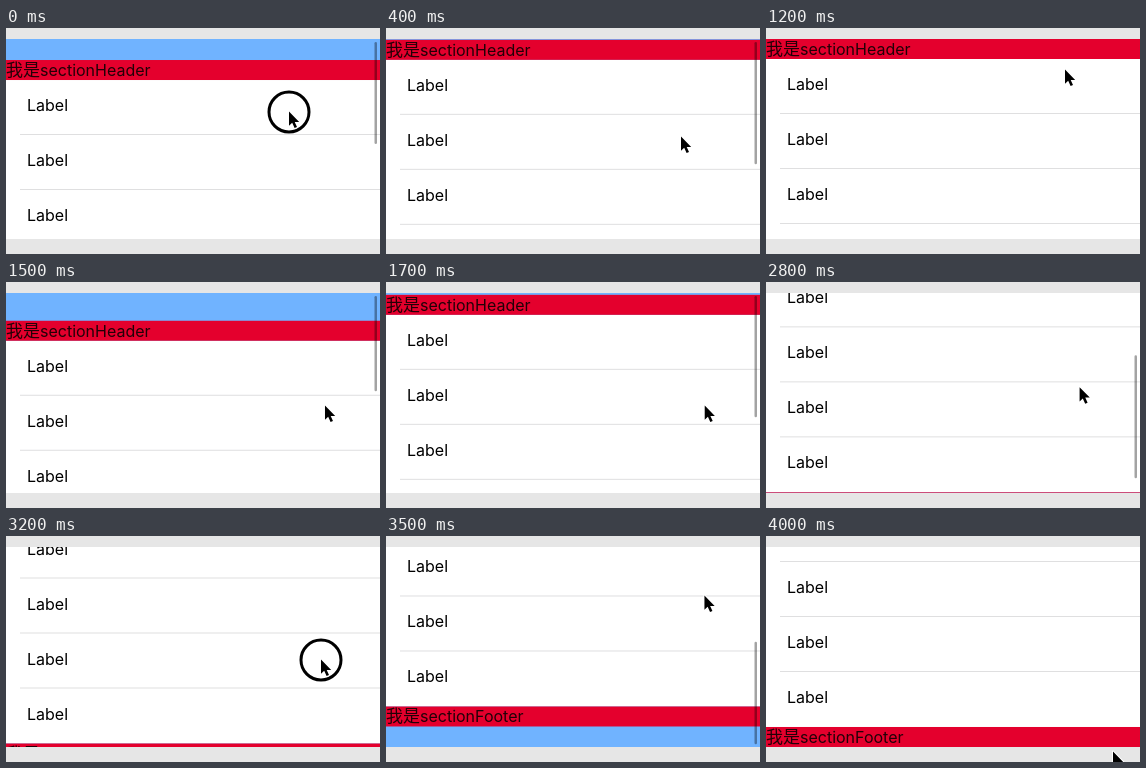
An HTML page with a canvas that plays this animation: 374 px wide and 226 px high, repeating every 4100 ms.

```html
<!DOCTYPE html>
<html lang="zh">
<head>
<meta charset="utf-8">
<style>
  html, body { margin: 0; width: 100%; height: 100%; overflow: hidden; background: #e6e6e6; }
  canvas { display: block; }
</style>
</head>
<body>
<canvas id="stage" width="374" height="226"></canvas>
<script>
const ctx = document.getElementById('stage').getContext('2d');
const LOOP = 4100, STEP = 100;
const TOP = 11, VIEW = 200, ROW = 55, BAR = 20, ROWS = 5;
const CONTENT = BAR * 2 + ROW * ROWS, MAX = CONTENT - VIEW;
const RED = '#e4002d', BLUE = '#70b3ff';

// Pointer path: time, x, y
const path = [
  [0, 283, 84], [100, 295, 109], [700, 295, 109], [1200, 299, 42], [1250, 299, 42],
  [1440, 319, 124], [2180, 318, 124], [2300, 313, 98], [2370, 311, 76], [2500, 311, 72],
  [3000, 315, 124], [3210, 315, 124], [3460, 318, 60], [3550, 319, 60], [4000, 347, 216]
];

// Each drag: pressed from/to, pointer y at the press, scroll offset at the press
const drags = [
  { from: 0, to: 110, y: 41.3, base: 0 },
  { from: 1230, to: 1450, y: 42, base: 0 },
  { from: 2150, to: 2370, y: 124, base: 0 },
  { from: 3130, to: 3470, y: 124, base: 98.5 }
];

// Scroll indicator: shown from, fade start
const shown = [[0, 420], [1260, 1740], [2200, 2860], [3220, 3780]];

const clamp = (v, lo, hi) => Math.min(hi, Math.max(lo, v));
const rubber = d => VIEW * (1 - 1 / (d * 0.55 / VIEW + 1));

function pointer(t) {
  let i = 0;
  while (i < path.length - 2 && t >= path[i + 1][0]) i++;
  const [t0, x0, y0] = path[i], [t1, x1, y1] = path[i + 1];
  let k = clamp((t - t0) / (t1 - t0), 0, 1);
  if (t1 - t0 > 300) k = k * k * (3 - 2 * k);
  return { x: x0 + (x1 - x0) * k, y: y0 + (y1 - y0) * k };
}

function dragged(drag, t) {
  const raw = drag.base + drag.y - pointer(t).y;
  if (raw < 0) return -rubber(-raw);
  if (raw > MAX) return MAX + rubber(raw - MAX);
  return raw;
}

function scrollAt(t) {
  const drag = drags.filter(d => t >= d.from).pop();
  if (t <= drag.to) return dragged(drag, t);
  const start = dragged(drag, drag.to), dt = t - drag.to;
  const edge = clamp(start, 0, MAX);
  if (edge !== start) {
    const w = dt * 0.019;
    return edge + (start - edge) * (1 + w) * Math.exp(-w);
  }
  return 98.5 + (start - 98.5) * Math.exp(-dt / 150);
}

function rect(x, y, w, h, color) {
  ctx.fillStyle = color;
  ctx.fillRect(x, y, w, h);
}

function text(str, x, y, font) {
  ctx.fillStyle = '#000';
  ctx.font = font;
  ctx.fillText(str, x, y);
}

function band(y, title) {
  rect(0, y, 374, BAR, RED);
  ctx.globalAlpha = 0.85;
  text('我是', 0, y + 16, '17px "Noto Sans CJK SC", "Noto Sans CJK", sans-serif');
  text(title, 34, y + 16, '16px Inter, sans-serif');
  ctx.globalAlpha = 1;
}

function list(scroll) {
  const y = TOP - scroll;
  rect(0, TOP, 374, VIEW, BLUE);
  rect(0, y + BAR, 374, ROW * ROWS, '#fff');
  for (let i = 0; i < ROWS; i++) {
    const top = y + BAR + i * ROW;
    text('Label', 21, top + 31, '16px Inter, sans-serif');
    if (i < ROWS - 1) rect(14, top + ROW - 1, 360, 1, '#dfdfe0');
  }
  band(y, 'sectionHeader');
  band(y + BAR + ROW * ROWS, 'sectionFooter');
}

function indicator(scroll, t) {
  const phase = shown.filter(p => t >= p[0]).pop();
  const alpha = clamp(1 - (t - phase[1]) / 150, 0, 1);
  if (!alpha) return;
  const inside = clamp(scroll, 0, MAX), over = Math.abs(scroll - inside);
  const top = 14 + inside * 195 / CONTENT + Math.max(0, scroll - MAX);
  ctx.globalAlpha = alpha * 0.36;
  ctx.fillStyle = '#000';
  ctx.beginPath();
  ctx.roundRect(368.5, top, 2.5, 123 - over, 1.25);
  ctx.fill();
  ctx.globalAlpha = 1;
}

function cursor(t) {
  const { x, y } = pointer(t);
  if (drags.some(d => t >= d.from && t <= d.to)) {
    ctx.beginPath();
    ctx.arc(x, y, 20, 0, Math.PI * 2);
    ctx.lineWidth = 3;
    ctx.strokeStyle = '#000';
    ctx.stroke();
  }
  ctx.save();
  ctx.translate(x, y - 0.5);
  const arrow = new Path2D('M0 0V14.2L3.2 11.2L5.6 16.6L8 15.6L5.7 10.4H10.2Z');
  ctx.lineWidth = 2;
  ctx.lineJoin = 'round';
  ctx.strokeStyle = '#fff';
  ctx.stroke(arrow);
  ctx.fillStyle = '#000';
  ctx.fill(arrow);
  ctx.restore();
}

function draw(now) {
  const t = Math.floor((now % LOOP) / STEP) * STEP;
  const scroll = scrollAt(t);
  rect(0, 0, 374, 226, '#e6e6e6');
  ctx.save();
  ctx.beginPath();
  ctx.rect(0, TOP, 374, VIEW);
  ctx.clip();
  list(scroll);
  indicator(scroll, t);
  ctx.restore();
  cursor(t);
}

let start = null;
function tick(now) {
  if (start === null) start = now;
  draw(Math.max(0, now - start));
  requestAnimationFrame(tick);
}
draw(0);
requestAnimationFrame(tick);
</script>
</body>
</html>
```
